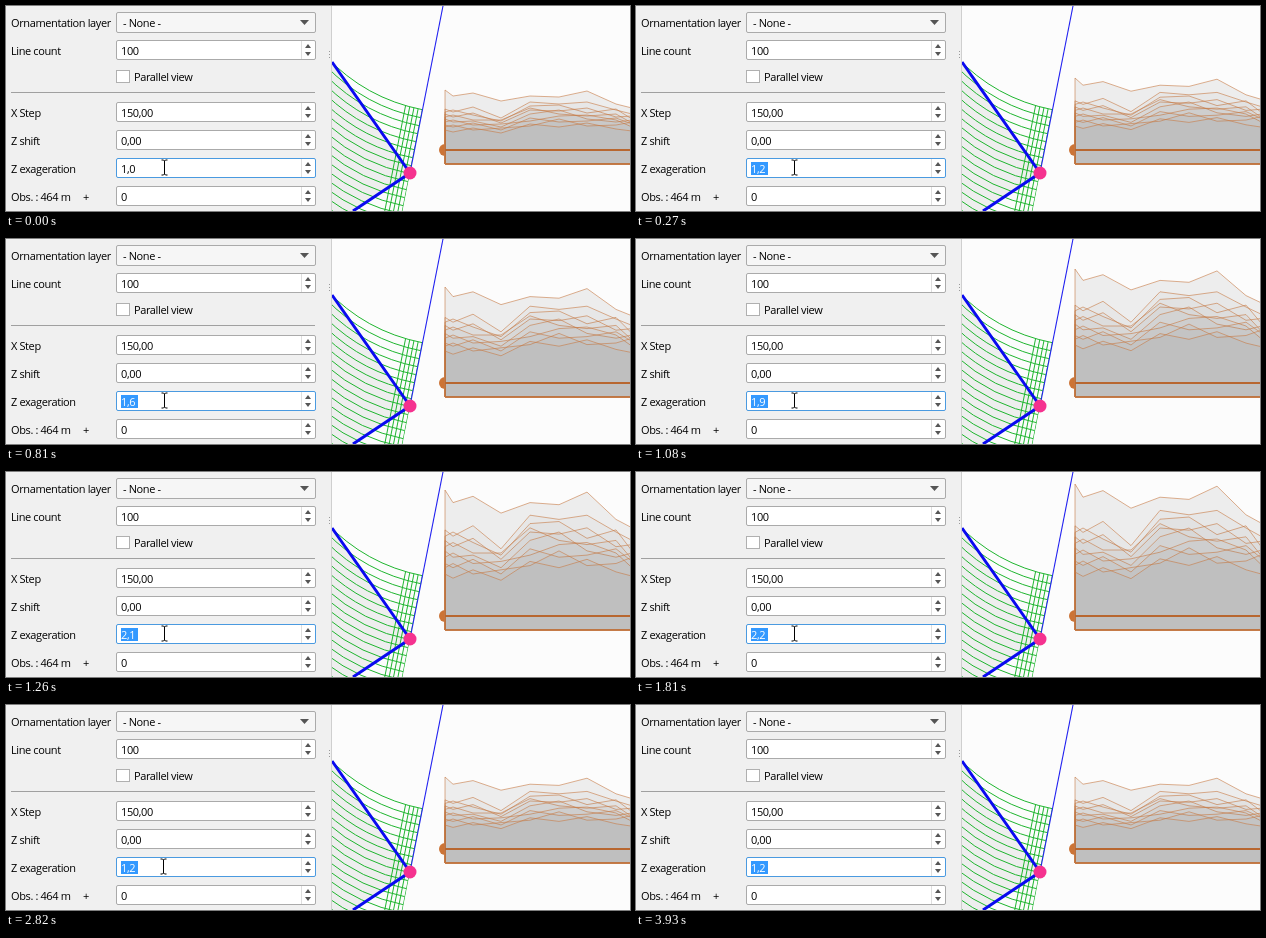
An HTML page that plays this animation: 624x205 px, repeating every 4110 ms.

```html
<!DOCTYPE html>
<html lang="en">
<head>
<meta charset="utf-8">
<title>Z exaggeration</title>
<style>
  html, body { margin: 0; width: 100%; height: 100%; overflow: hidden; background: #f0f0f0; }
  svg { display: block; width: 624px; height: 205px; }
  text { font: 11px "Open Sans", "Noto Sans", sans-serif; letter-spacing: -.38px; fill: #000; white-space: pre; }
</style>
</head>
<body>
<svg id="stage" viewBox="0 0 624 205">
  <defs>
    <clipPath id="view"><rect x="326" width="298" height="205"/></clipPath>
    <clipPath id="fan"><path d="M326 0H437L396.5 205H326Z"/></clipPath>
  </defs>
  <rect width="624" height="205" fill="#f0f0f0"/>
  <g id="form"></g>
  <g clip-path="url(#view)">
    <rect x="326" width="298" height="205" fill="#fcfcfc"/>
    <path d="M326 56L404 167L347 205H326Z" fill="#eee"/>
    <g id="grid" clip-path="url(#fan)" fill="none" stroke="#1fb52f"></g>
    <path d="M326 56L404 167L347 205" fill="none" stroke="#0a0af0" stroke-width="3"/>
    <path d="M437 0L404 167" stroke="#2020f0" stroke-width="1.1"/>
    <circle cx="404" cy="167" r="6.5" fill="#f5328f"/>
    <path d="M439 138A6 6 0 0 0 439 150Z" fill="#cc7436"/>
    <g id="relief" stroke="#c67a45" stroke-opacity=".6" stroke-width="1"></g>
    <path d="M439 144H624" stroke="#b86730" stroke-width="2"/>
  </g>
  <path d="M325.5 0V205" stroke="#cfcfcf"/>
  <path d="M323.5 45V53" stroke="#999" stroke-dasharray="1 2"/>
  <g id="entry">
    <rect id="mark" x="115" y="156" width="17" height="13" fill="#39f"/>
    <text id="value" x="115" y="167"></text>
    <rect id="caret" x="115" y="156" width="1" height="13"/>
  </g>
  <path id="beam" d="M-3 -7.5H-1L0 -6.5L1 -7.5H3M0 -6.5V6.5M-3 7.5H-1L0 6.5L1 7.5H3" fill="none" stroke="#000"/>
</svg>
<script>
const LOOP = 4110;
const BASE = 144, FLOOR = 158;
const $ = id => document.getElementById(id);

function add(parent, tag, attrs, content) {
  const node = document.createElementNS("http://www.w3.org/2000/svg", tag);
  for (const key in attrs) node.setAttribute(key, attrs[key]);
  if (content) node.textContent = content;
  parent.appendChild(node);
  return node;
}

const form = $("form");
const label = (x, y, s) => add(form, "text", { x, y }, s);

function field(y, border = "#aaa") {
  add(form, "rect", { x: 110.5, y: y + .5, width: 199, height: 19, rx: 1.5, fill: "#fff", stroke: border });
  add(form, "path", { d: `M295.5 ${y + 1}v18`, stroke: "#dedede" });
  add(form, "path", { d: `M299 ${y + 8}l3 -4l3 4zM299 ${y + 12}l3 4l3 -4z`, fill: "#555" });
}

function buildForm() {
  add(form, "rect", { x: 110.5, y: 6.5, width: 199, height: 20, rx: 1.5, fill: "#f6f6f6", stroke: "#aaa" });
  add(form, "path", { d: "M294 14h9l-4.5 5z", fill: "#555" });
  [34, 96, 124, 180].forEach(y => field(y));
  field(152, "#4a9ae0");
  add(form, "rect", { x: 110.5, y: 64.5, width: 13, height: 12, fill: "#fff", stroke: "#b0b0b0" });
  add(form, "path", { d: "M5 86.5H309", stroke: "#a0a0a0" });
  label(5, 21, "Ornamentation layer");
  label(117, 21, "- None -");
  label(5, 49, "Line count");
  label(115, 49, "100");
  label(128, 75, "Parallel view");
  label(5, 111, "X Step");
  label(115, 111, "150,00");
  label(5, 139, "Z shift");
  label(115, 139, "0,00");
  label(5, 167, "Z exageration");
  label(5, 195, "Obs. : 464 m");
  label(77, 195, "+");
  label(115, 195, "0");
}

// Equal arcs sliding along the line of sight, crossed by parallels to it.
function buildGrid() {
  const r = 180, slope = 33 / 167;
  for (let dy = 0; dy < 150; dy += 8) {
    const cx = 451 - dy * slope, cy = -73 + dy;
    const x = 320, y = cy + Math.sqrt(r * r - (x - cx) ** 2);
    add($("grid"), "path", { d: `M${x} ${y}A${r} ${r} 0 0 0 ${cx - 35} ${cy + 176.6}` });
  }
  for (let k = 0; k < 5; k++) {
    const x = 416.3 - k * 4.2, y = 104 - k;
    add($("grid"), "path", { d: `M${x} ${y}L${x - (205 - y) * slope} 205` });
  }
}

const STOPS = [439, 447, 467, 495, 524, 553, 581, 610, 626];
const HEIGHTS = [
  [60, 54, 57, 49, 54, 53, 59, 46, 42],
  [41, 38, 43, 32, 48, 46, 48, 40, 36],
  [38, 40, 35, 29, 44, 45, 37, 41, 31],
  [36, 33, 37, 27, 40, 39, 42, 33, 34],
  [33, 35, 30, 30, 42, 36, 34, 36, 27],
  [31, 28, 29, 23, 36, 40, 31, 28, 30],
  [28, 30, 25, 26, 29, 34, 35, 30, 23],
  [25, 23, 27, 20, 32, 28, 29, 32, 26],
  [23, 25, 20, 22, 24, 31, 24, 25, 28],
  [20, 18, 22, 17, 26, 23, 27, 21, 19]
];
const layers = HEIGHTS.map((row, i) =>
  add($("relief"), "path", { fill: "#000", "fill-opacity": i ? .022 : .06 }));

function drawRelief(scale) {
  HEIGHTS.forEach((row, i) => {
    const line = row.map((h, j) => `L${STOPS[j]} ${(BASE - h * scale).toFixed(2)}`).join("");
    layers[i].setAttribute("d", `M439 ${FLOOR}${line}V${FLOOR}Z`);
  });
}

// Bursts of wheel steps: start time and the tenths shown every 90 ms.
const BURSTS = [
  [0, [10, 10, 11, 12, 13, 14, 15, 16]],
  [990, [18, 19, 20, 21, 22]],
  [2090, [21, 19, 17, 15, 13, 12]]
];
const BLINKS = [310, 810, 1310, 1810, 2310, 2820, 3370, 3930];

function tenthsAt(t) {
  const [start, steps] = BURSTS.filter(b => b[0] <= t).pop();
  return steps[Math.min(steps.length - 1, Math.floor((t - start) / 90))];
}

function draw(t) {
  const tenths = tenthsAt(t), selected = t >= 90;
  drawRelief(tenths / 10);
  $("value").textContent = (tenths / 10).toFixed(1).replace(".", ",");
  $("value").style.fill = selected ? "#fff" : "#000";
  $("mark").style.display = selected ? "" : "none";
  $("caret").style.fill = selected ? "#c60" : "#000";
  $("caret").style.display = BLINKS.filter(b => b <= t).length % 2 ? "" : "none";
  const [x, y] = t < 2540 ? [158.5, 161.5] : t < 3280 ? [157.5, 161.5] : [175.5, 196.5];
  $("beam").setAttribute("transform", `translate(${x} ${y})`);
  $("beam").style.display = t < 3370 ? "" : "none";
}

buildForm();
buildGrid();
const began = performance.now();
function tick() {
  draw((performance.now() - began) % LOOP);
  requestAnimationFrame(tick);
}
tick();
</script>
</body>
</html>
```
